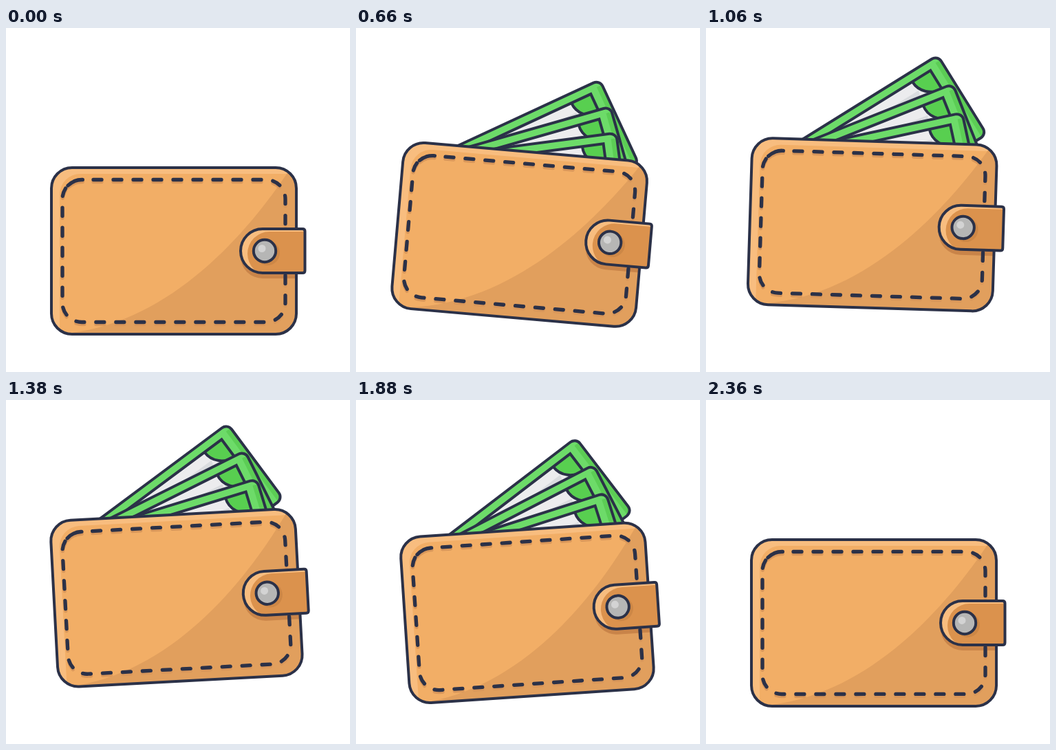
An HTML page for the animation above (2380 ms loop, 500 px wide and 500 px high).

```html
<!DOCTYPE html>
<html lang="en">
<head>
<meta charset="utf-8">
<title>Wallet</title>
<style>
  html, body { margin: 0; width: 100%; height: 100%; overflow: hidden; background: #fff; }
  svg { display: block; width: 100vw; height: 100vh; }
  .line { fill: none; stroke: #2b3148; stroke-width: 4; stroke-linejoin: round; }
  .stitch { fill: none; stroke-width: 5.3; stroke-linecap: round; stroke-dasharray: 12 17; }
</style>
</head>
<body>
<svg viewBox="0 0 500 500">
  <defs>
    <rect id="body" x="66" y="203" width="356" height="242" rx="30"/>
    <clipPath id="bodyClip"><use href="#body"/></clipPath>

    <path id="strap" d="M431 292H373A32 32 0 0 0 373 356H431Q434.500 356 434.500 352.500V295.500Q434.500 292 431 292Z"/>
    <clipPath id="strapClip"><use href="#strap"/></clipPath>

    <!-- one dashed seam, plus the overlap where it closes -->
    <path id="stitches" d="M127 220.500H378A28 28 0 0 1 406 248.500V399.500A28 28 0 0 1 378 427.500
      H110A28 28 0 0 1 82 399.500V248.500A28 28 0 0 1 110 220.500H115
      M90 229A28 28 0 0 1 100 222.400"/>

    <!-- banknote, drawn around its pivot near the top left corner -->
    <rect id="note" x="-4" y="-4.700" width="270.500" height="135" rx="10"/>
    <clipPath id="noteClip"><use href="#note"/></clipPath>
    <rect id="panel" x="16" y="8.500" width="230" height="108"/>
    <clipPath id="panelClip"><use href="#panel"/></clipPath>
    <g id="bill">
      <use href="#note" fill="#6ddb69"/>
      <rect x="258" y="3" width="20" height="140" fill="#5ccd55" clip-path="url(#noteClip)"/>
      <use href="#panel" fill="#ececee"/>
      <g clip-path="url(#panelClip)">
        <path d="M90 24H216L190 116H60Z" fill="#dadcdf"/>
        <circle class="line" cx="246" cy="8.500" r="31" style="fill:#58cf50"/>
        <circle class="line" cx="246" cy="116.500" r="31" style="fill:#58cf50"/>
      </g>
      <use href="#panel" class="line" style="stroke-linejoin:miter"/>
      <use href="#note" class="line"/>
    </g>
  </defs>

  <g id="wallet">
    <use href="#bill" class="bill"/>
    <use href="#bill" class="bill"/>
    <use href="#bill" class="bill"/>

    <g clip-path="url(#bodyClip)">
      <use href="#body" fill="#f8bd7f"/>
      <rect x="78" y="212" width="360" height="260" rx="30" fill="#f2ae66"/>
      <path d="M412 206C350 300 240 425 95 443V450H430V206Z" fill="#e19f5d"/>
      <use href="#stitches" class="stitch" stroke="#d9975a" y="3"/>
      <use href="#strap" fill="#c98449" y="8"/>
    </g>
    <use href="#stitches" class="stitch" stroke="#2b3148"/>
    <use href="#body" class="line"/>

    <g clip-path="url(#strapClip)">
      <use href="#strap" fill="#f8bd7f"/>
      <use href="#strap" fill="#db924d" x="10" y="4"/>
      <circle cx="380" cy="327" r="18" fill="#cd8746"/>
    </g>
    <use href="#strap" class="line"/>
    <circle class="line" cx="376" cy="324" r="16.200" style="fill:#b6b6b5"/>
    <circle cx="372" cy="320.500" r="5.500" fill="#d3d3d3"/>
  </g>
</svg>
<script>
  const LOOP = 2380;
  const wallet = document.getElementById('wallet');
  const bills = document.querySelectorAll('.bill');
  const FAN = [33.6, 23.5, 14];

  const LIFT = [[0, 0], [1190, -39.2], [2380, 0]];
  const TILT = [[0, 0], [700, 5], [1650, -5], [2380, 0]];
  const OPEN = [[170, 0], [790, 1], [1890, 1], [2230, 0]];

  // Smooth interpolation between [time, value] keys, held outside them
  function track(keys, t) {
    if (t <= keys[0][0]) return keys[0][1];
    for (let i = 1; i < keys.length; i++) {
      const [t0, v0] = keys[i - 1], [t1, v1] = keys[i];
      if (t < t1) {
        const u = (t - t0) / (t1 - t0);
        return v0 + (v1 - v0) * u * u * (3 - 2 * u);
      }
    }
    return keys[keys.length - 1][1];
  }

  function draw() {
    const t = performance.now() % LOOP;
    const open = track(OPEN, t);
    wallet.setAttribute('transform',
      `translate(0 ${track(LIFT, t)}) rotate(${track(TILT, t)} 250 250)`);
    bills.forEach((bill, i) =>
      bill.setAttribute('transform', `translate(112 226.5) rotate(${-FAN[i] * open})`));
    requestAnimationFrame(draw);
  }
  draw();
</script>
</body>
</html>
```
